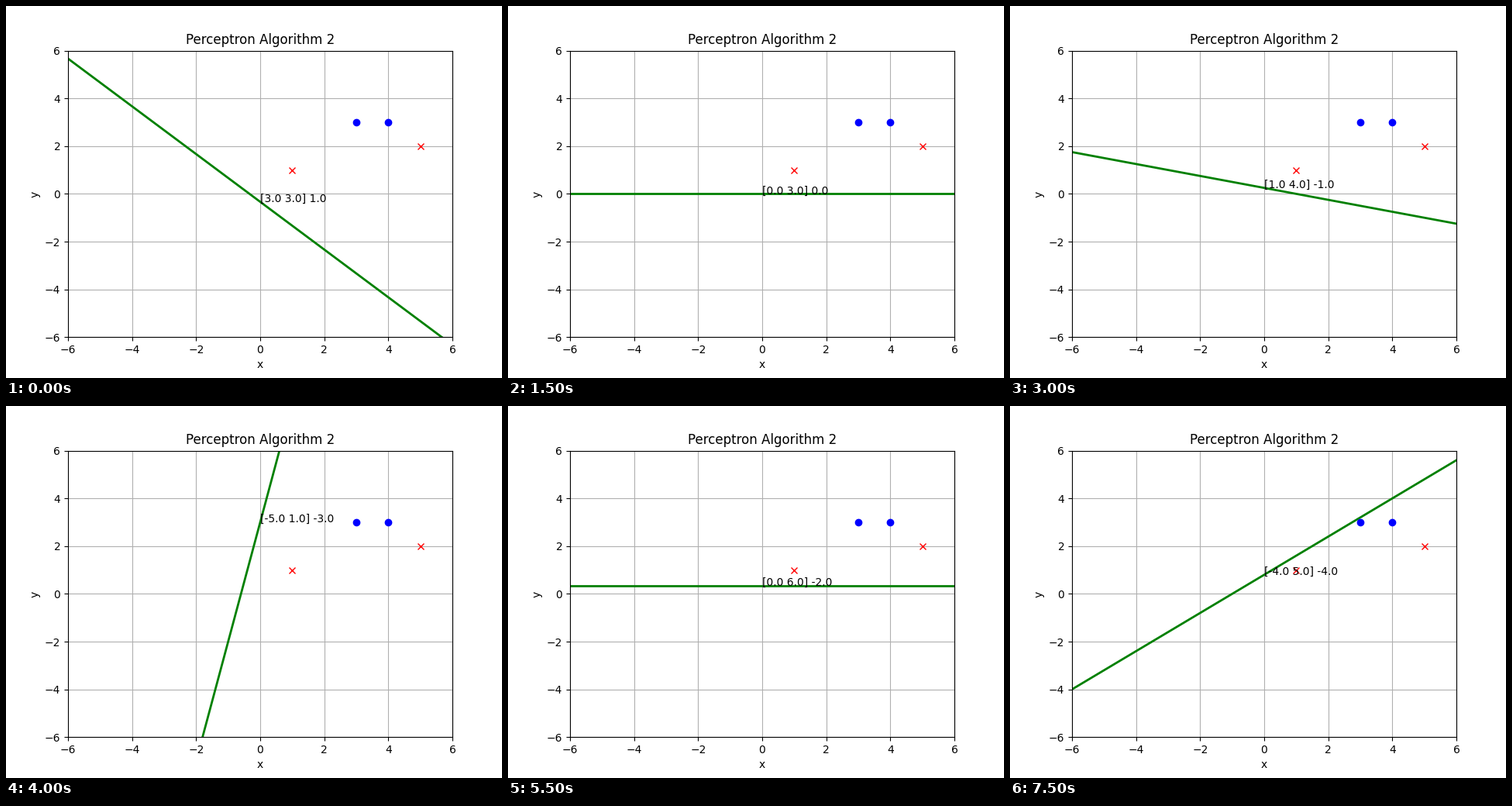
A matplotlib script for the animation above (8 s loop, 640 by 480 pixels).

```python
import itertools

import matplotlib.pyplot as plt
import numpy as np
from matplotlib.animation import FuncAnimation

STEPS = 16
STEP_MS = 500
LIMIT = 6

SAMPLES = [((3, 3), 1), ((4, 3), 1), ((1, 1), -1), ((5, 2), -1)]


def train(count):
    """Return the weights and bias after each of the first updates."""
    w, b = np.zeros(2), 0.0
    states = []
    for point, label in itertools.cycle(SAMPLES):
        if label * (w @ point + b) <= 0:
            w = w + label * np.array(point)
            b += label
            states.append((w, b))
            if len(states) == count:
                return states


states = train(STEPS)

fig, ax = plt.subplots(figsize=(6.4, 4.8), dpi=100)
ax.set(xlim=(-LIMIT, LIMIT), ylim=(-LIMIT, LIMIT), xlabel="x", ylabel="y",
       title="Perceptron Algorithm 2")
ax.grid(True)

line, = ax.plot([], [], "g", lw=2)
label_text = ax.text(0, 0, "")

for (px, py), label in SAMPLES:
    ax.plot(px, py, "bo" if label > 0 else "rx")

xs = np.array([-LIMIT, LIMIT])


def update(i):
    # A vertical boundary has no slope, so the previous one stays.
    while states[i][0][1] == 0:
        i -= 1
    (w0, w1), b = states[i]
    line.set_data(xs, -(w0 * xs + b) / w1)
    label_text.set_position((0, -b / w1))
    label_text.set_text(f"[{w0:.1f} {w1:.1f}] {b:.1f}")
    return line, label_text


anim = FuncAnimation(fig, update, frames=STEPS, interval=STEP_MS,
                     init_func=lambda: update(0), repeat=True,
                     repeat_delay=0, blit=False)
plt.show()
```
